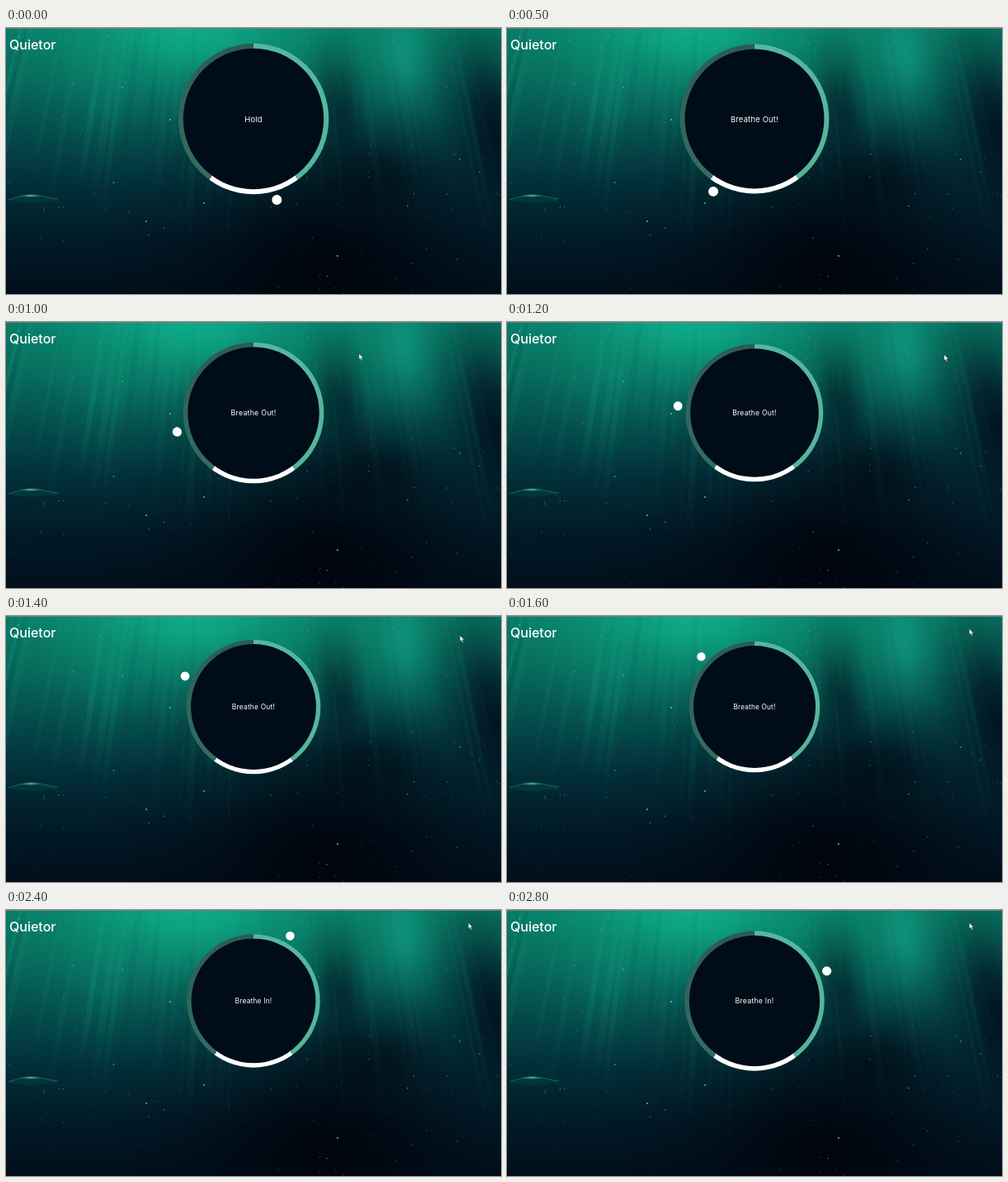
Recreate the animation shown at these times as an HTML page with a canvas. Size 600 px wide and 322 px high, loop 2.9 s.

```html
<!DOCTYPE html>
<html lang="en">
<head>
<meta charset="utf-8">
<title>Breathing circle</title>
<style>
  html, body { margin: 0; width: 100%; height: 100%; overflow: hidden; background: #010d18; }
  body { position: relative; color: #fff; font-family: Inter, "Open Sans", sans-serif; }
  canvas, h1, #breath, #breath *, #cursor { position: absolute; }
  canvas { left: 0; top: 0; }
  h1 { left: 4px; top: 10px; margin: 0; font-size: 16px; line-height: 20px; font-weight: 500; }
  #breath { left: 300.4px; top: 110.3px; width: 0; height: 0; }
  .ring, .disc, #arm i { border-radius: 50%; }
  .ring {
    inset: -76px;
    background: conic-gradient(#55b7a4 0%, #55b498 40%, #fff 40%, #fff 60%, #336d62 60%, #2a5b52 100%);
  }
  .disc { inset: -71.25px; background: #000c17; }
  #text {
    left: -60px; top: -10px; width: 120px;
    font-size: 7.9px; letter-spacing: .18px; line-height: 20px; text-align: center;
  }
  #arm { width: 0; height: 0; }
  #arm i { left: -5px; top: -90.5px; width: 10px; height: 10px; background: #fff; }
  #cursor { left: 0; top: 0; }
</style>
</head>
<body>
<canvas id="sea" width="600" height="322"></canvas>
<h1>Quietor</h1>
<div id="breath">
  <div class="ring"></div>
  <div class="disc"></div>
  <div id="text"></div>
  <div id="arm"><i></i></div>
</div>
<svg id="cursor" width="8" height="11">
  <path d="M.4 .4V7.6L2 6.2 3.2 9 4.5 8.4 3.3 5.7H5.5Z" fill="#fff" stroke="#123" stroke-width=".4"/>
</svg>
<script>
const $ = id => document.getElementById(id);
const W = 600, H = 322;
const LOOP = 2900, STEP = 100;
const EXHALE = 420, INHALE = 1940, BREATH = 1500;

function paintSea(ctx) {
  let seed = 11;
  const rand = () => (seed = seed * 16807 % 2147483647) / 2147483647;

  const fade = (gradient, colors) => {
    colors.forEach((c, i) => gradient.addColorStop(i / (colors.length - 1), c));
    return gradient;
  };
  const glow = (x, y, rx, ry, rgb, alpha, tilt = 0) => {
    ctx.save();
    ctx.translate(x, y);
    ctx.rotate(tilt);
    ctx.scale(rx, ry);
    ctx.fillStyle = fade(ctx.createRadialGradient(0, 0, 0, 0, 0, 1),
      [1, .75, .35, .1, 0].map(k => `rgba(${rgb},${alpha * k})`));
    ctx.fillRect(-1, -1, 2, 2);
    ctx.restore();
  };
  const speck = (x, y, r, alpha) => {
    ctx.fillStyle = `rgba(130,225,195,${alpha})`;
    ctx.beginPath();
    ctx.arc(x, y, r, 0, 7);
    ctx.fill();
  };

  ctx.fillStyle = fade(ctx.createLinearGradient(0, 0, 0, H),
    ['#088069', '#076a5b', '#044a4a', '#022d37', '#011a27', '#010f1b']);
  ctx.fillRect(0, 0, W, H);

  glow(220, -5, 230, 130, '16,190,150', .75);
  glow(130, 70, 110, 130, '10,140,115', .35, .2);
  glow(482, 30, 65, 95, '16,155,128', .7, -.25);

  // Deep water
  glow(390, 290, 290, 210, '0,4,13', .97);
  glow(440, 185, 160, 95, '1,12,24', .75);
  glow(595, 130, 95, 210, '1,16,31', .95, -.25);
  glow(405, 100, 48, 120, '1,24,34', .7, -.15);

  // Light shafts fanning out from above
  for (let i = 0; i < 80; i++) {
    const x = 300 + (rand() - .55) * 640, w = 1 + rand() * 7, lean = (x - 300) * .28;
    const rgb = rand() < .65 ? '30,190,155' : '0,35,45';
    const alpha = (.03 + rand() * .06) * (x < 260 ? 1.2 : .6);
    const end = 130 + rand() * 170;
    ctx.fillStyle = fade(ctx.createLinearGradient(0, 0, 0, end),
      [`rgba(${rgb},${alpha * .5})`, `rgba(${rgb},${alpha})`, `rgba(${rgb},0)`]);
    ctx.beginPath();
    ctx.moveTo(x, 0);
    ctx.lineTo(x + w, 0);
    ctx.lineTo(x + w * 1.6 + lean, H);
    ctx.lineTo(x + lean, H);
    ctx.fill();
  }

  for (let i = 0; i < 650; i++) {
    speck(rand() * W, rand() * H, .3 + rand() ** 3 * .6, .12 + rand() ** 2 * .5);
  }
  [[170, 234], [199, 111], [402, 276], [240, 212]].forEach(([x, y]) => speck(x, y, .9, .85));

  // Fish
  ctx.fillStyle = 'rgba(5,70,68,.45)';
  ctx.fill(new Path2D('M2 208Q28 199 57 206L63 205 61 208 64 213 56 209Q30 215 2 208Z'));
  ctx.strokeStyle = 'rgba(30,150,128,.6)';
  ctx.lineWidth = .9;
  ctx.stroke(new Path2D('M3 208Q28 198 56 206L63 207M45 217L47 222'));
  glow(30, 203, 15, 2.5, '80,215,175', .8);

  ctx.fillStyle = '#6b7f7d';
  ctx.fillRect(0, 0, W, 1);
}

const mix = (a, b, k) => a + (b - a) * Math.min(1, Math.max(0, k));

function scaleAt(t) {
  return t < INHALE
    ? mix(1.2, 1, (t - EXHALE) / BREATH)
    : mix(1, 1.2, (t - INHALE) / BREATH);
}

function angleAt(t) {
  return t < 800 ? 163.9 + t * .0914 : 237 + (t - 800) * .0953;
}

function cursorAt(t) {
  const first = (t - 800) / 400, second = (t - 1200) / 300;
  return [mix(mix(325.5, 529.5, first), 560, second), mix(mix(36.5, 39, first), 15, second)];
}

function draw() {
  const t = Math.floor(performance.now() % LOOP / STEP) * STEP;
  const [x, y] = cursorAt(t);
  $('breath').style.transform = `scale(${scaleAt(t)})`;
  $('arm').style.transform = `rotate(${angleAt(t)}deg)`;
  $('text').textContent = t < EXHALE ? 'Hold' : t < INHALE ? 'Breathe Out!' : 'Breathe In!';
  $('cursor').style.transform = `translate(${x}px, ${y}px)`;
  $('cursor').style.visibility = t < 700 ? 'hidden' : 'visible';
  requestAnimationFrame(draw);
}

paintSea($('sea').getContext('2d'));
draw();
</script>
</body>
</html>
```
